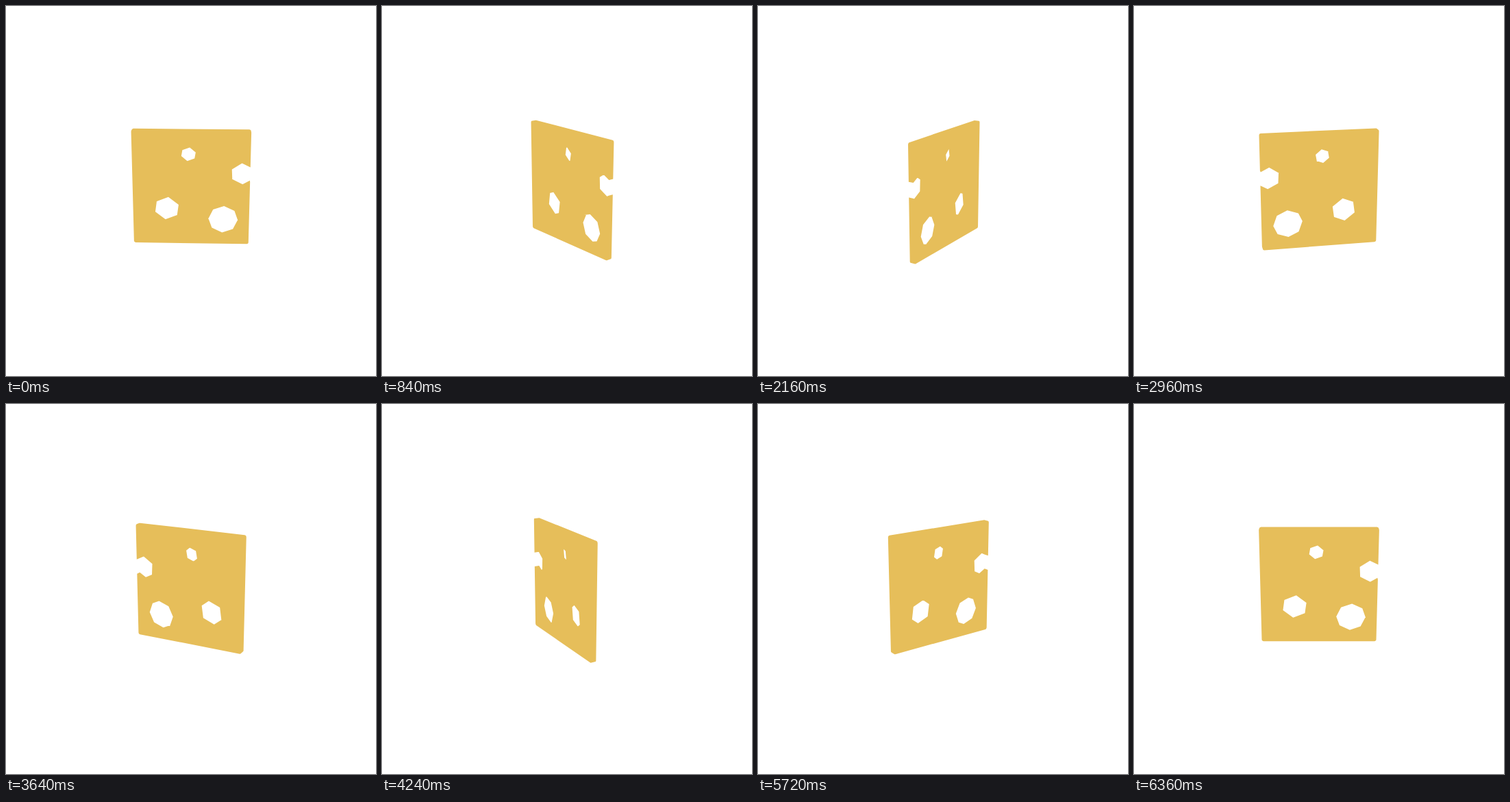
Write an HTML page that moves like this. It is 540 px wide and 540 px high and loops after 6400 ms.

```html
<!DOCTYPE html>
<html lang="en">
<head>
<meta charset="utf-8">
<title>Turning cheese slice</title>
<style>
  html, body { margin: 0; height: 100%; overflow: hidden; background: #fff; }
  svg { display: block; width: 100%; height: 100%; }
</style>
</head>
<body>
<svg viewBox="0 0 540 540"><path id="slice" fill="#e6be5a"/></svg>
<script>
const LOOP = 6400, STEP = 40;
const FRONT = -0.02, BACK = -0.11;              // slab faces, measured from the turning axis
const HALF_W = 1, HALF_H = 1.01, RADIUS = 0.03;
const camera = { x: 270, y: 266.4, focal: 1012, distance: 11.8, sin: 0.305, cos: 0.952 };

// Points on a circle; the turn and sweep are in degrees.
function arc(x, y, r, count, turn, sweep) {
  return Array.from({ length: count }, (_, i) => {
    const a = (turn + sweep * i / count) * Math.PI / 180;
    return [x + r * Math.cos(a), y + r * Math.sin(a)];
  });
}

const polygon = (x, y, r, sides, turn) => arc(x, y, r, sides, turn, 360);

const corner = (sideX, sideY, turn) =>
  arc(sideX * (HALF_W - RADIUS), sideY * (HALF_H - RADIUS), RADIUS, 4, turn, -120);

// A hexagonal hole cut open by the right edge.
function bite(y) {
  const inside = polygon(0.868, y, 0.2, 6, 93).filter(([x]) => x < HALF_W);
  return [[HALF_W, y + 0.13], ...inside, [HALF_W, y - 0.13]];
}

// The outline runs clockwise and the holes the other way.
const rings = [
  [...corner(-1, 1, 180), ...corner(1, 1, 90), ...bite(0.25),
   ...corner(1, -1, 0), ...corner(-1, -1, -90)],
  polygon(0.553, -0.575, 0.26, 8, 87),
  polygon(-0.045, 0.585, 0.132, 6, 80),
  polygon(-0.42, -0.385, 0.222, 6, 82)
];

const slice = document.getElementById('slice');

function projector(angle) {
  const s = Math.sin(angle), c = Math.cos(angle);
  return z => ([x, y]) => {
    const depth = x * s + z * c;
    const scale = camera.focal / (camera.distance - y * camera.sin - depth * camera.cos);
    return [camera.x + (x * c - z * s) * scale,
            camera.y - (y * camera.cos - depth * camera.sin) * scale];
  };
}

function area(points) {
  return points.reduce((sum, [x, y], i) => {
    const [nx, ny] = points[(i + 1) % points.length];
    return sum + x * ny - nx * y;
  }, 0);
}

const toPath = points => 'M' + points.map(p => p.map(v => v.toFixed(2)).join(' ')).join('L') + 'Z';

// All pieces wind the same way, so the nonzero fill is their seamless union.
function piece(polygons) {
  const flip = area(polygons[0]) < 0;
  return polygons.map(p => toPath(flip ? [...p].reverse() : p)).join('');
}

function draw(time) {
  const step = Math.floor((time % LOOP) / STEP);
  const project = projector((step + 1) * STEP / LOOP * 2 * Math.PI);
  const front = rings.map(ring => ring.map(project(FRONT)));
  const back = rings.map(ring => ring.map(project(BACK)));
  let d = piece(front) + piece(back);
  front.forEach((ring, r) => ring.forEach((p, i) => {
    const j = (i + 1) % ring.length;
    d += piece([[p, ring[j], back[r][j], back[r][i]]]);
  }));
  slice.setAttribute('d', d);
}

const began = performance.now();
function tick() {
  draw(performance.now() - began);
  requestAnimationFrame(tick);
}
tick();
</script>
</body>
</html>
```
